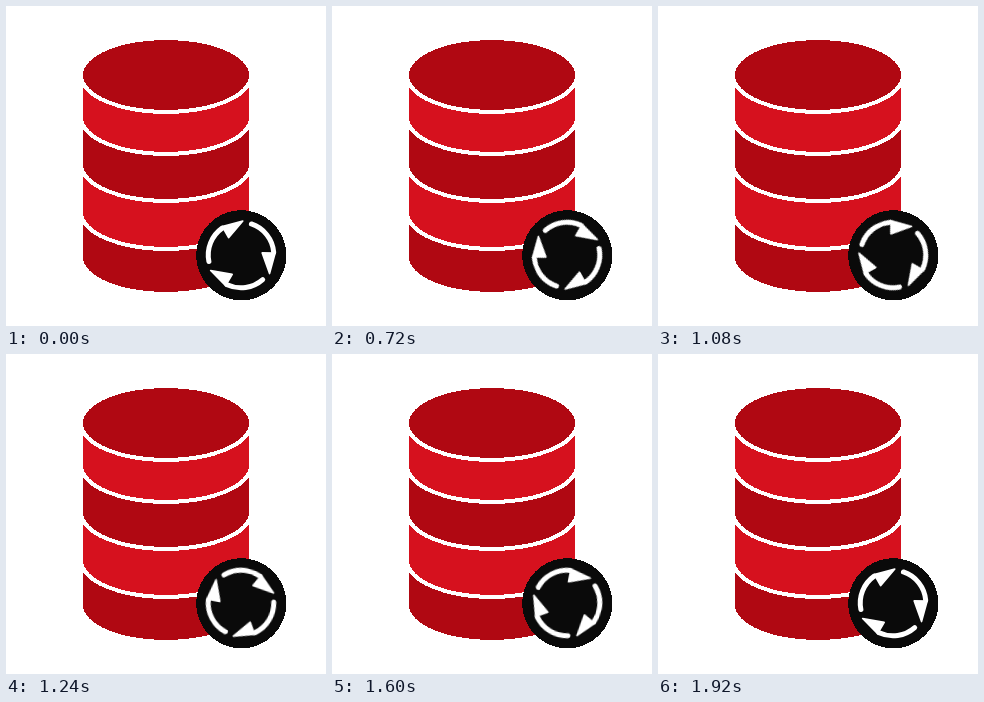
Write an HTML page that moves like this. It is 320 px wide and 320 px high and loops after 2440 ms.

```html
<!DOCTYPE html>
<html lang="en">
<head>
<meta charset="utf-8">
<title>Database refresh</title>
<style>
  html, body { margin: 0; width: 100%; height: 100%; overflow: hidden; background: #fff; }
  svg { display: block; width: 100vw; height: 100vh; }
  .dark { fill: #b00812; }
  .bright { fill: #d6111e; }
  /* each slab's white outline forms the seam above the next one */
  .slabs { stroke: #fff; stroke-width: 8; paint-order: stroke; }
  .arc { fill: none; stroke: #fff; stroke-width: 5; stroke-linecap: round; }
  .head { fill: #fff; stroke: #fff; stroke-width: 1.6; stroke-linejoin: round; }
  .arrows { animation: spin 2440ms infinite; }
  /* rest, one turn in 36 ticks of 40 ms, rest */
  @keyframes spin {
    0% { transform: rotate(0deg); animation-timing-function: step-end; }
    19.67% { transform: rotate(0deg); animation-timing-function: steps(36, end); }
    78.68%, 100% { transform: rotate(360deg); }
  }
</style>
</head>
<body>
<svg viewBox="0 0 320 320">
  <defs>
    <g id="arrow">
      <path class="arc" d="M-32.1 6.5A32.8 32.8 0 0 1 -18.8 -26.9"/>
      <path class="head" d="M1.8 -34L-18.8 -28.6L-12.4 -17.3Z"/>
    </g>
  </defs>

  <g class="slabs" shape-rendering="crispEdges">
    <path class="dark" d="M77 69H243V251A83 35 0 0 1 77 251Z"/>
    <path class="bright" d="M77 69H243V206A83 35 0 0 1 77 206Z"/>
    <path class="dark" d="M77 69H243V158A83 35 0 0 1 77 158Z"/>
    <path class="bright" d="M77 69H243V111A83 35 0 0 1 77 111Z"/>
    <ellipse class="dark" cx="160" cy="69" rx="83" ry="35"/>
  </g>

  <circle cx="235.3" cy="249.3" r="45" fill="#0a0a0a" shape-rendering="crispEdges"/>
  <g transform="translate(235 249)">
    <g class="arrows">
      <use href="#arrow"/>
      <use href="#arrow" transform="rotate(120)"/>
      <use href="#arrow" transform="rotate(240)"/>
    </g>
  </g>
</svg>
</body>
</html>
```
